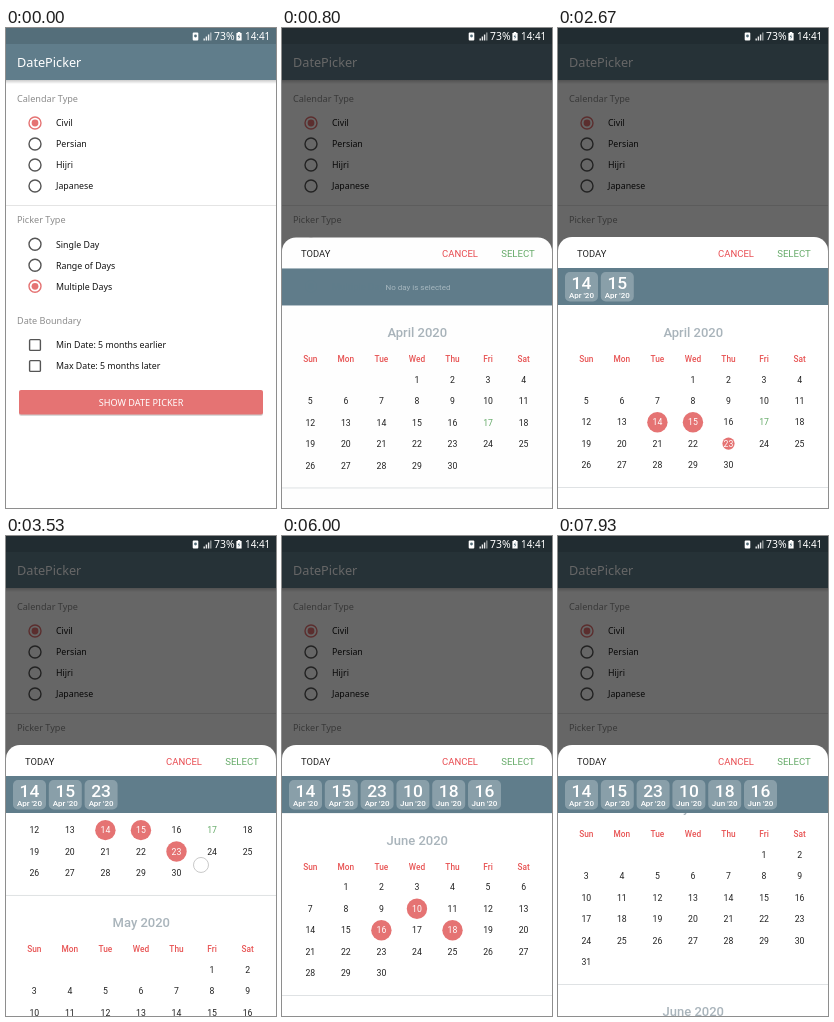
Recreate the animation shown at these times as an HTML page. Size 270 px wide and 480 px high, loop 8000 ms.

```html
<!DOCTYPE html>
<html lang="en">
<head>
<meta charset="utf-8">
<title>Date picker</title>
<style>
  html, body { margin: 0; width: 100%; height: 100%; overflow: hidden; background: #fff; }
  svg { display: block; width: 270px; height: 480px; }
  .ui { font-family: "Noto Sans", sans-serif; }
  .cal { font-family: Roboto, sans-serif; }
</style>
</head>
<body>
<svg id="stage" viewBox="0 0 270 480" width="270" height="480">
  <defs>
    <clipPath id="listClip"><rect y="277" width="270" height="203"/></clipPath>
    <clipPath id="btnClip"><rect x="13" y="362" width="244" height="24.5" rx="2"/></clipPath>
    <linearGradient id="shade" x2="0" y2="1">
      <stop offset="0" stop-opacity=".2"/><stop offset="1" stop-opacity="0"/>
    </linearGradient>
  </defs>
  <g id="form" class="ui"></g>
  <rect id="dim" width="270" height="480" opacity="0"/>
  <g id="sheet" class="cal" opacity="0"></g>
  <g id="status" class="ui"></g>
  <circle id="touch" r="7.5" fill="#fff" fill-opacity=".7" stroke="#bbb" stroke-width=".8" opacity="0"/>
</svg>
<script>
(() => {
const LOOP = 8000, RED = '#e57373', SLATE = '#607d8b', GREEN = '#66ab69';
const ROW = 21.4, COL = 35.55, COL0 = 28.3;
const $ = id => document.getElementById(id);
const clamp = v => Math.max(0, Math.min(1, v));
const ramp = (t, from, len) => clamp((t - from) / len);

function set(el, attrs) { for (const k in attrs) el.setAttribute(k, attrs[k]); }
function add(parent, tag, attrs) {
  const el = document.createElementNS('http://www.w3.org/2000/svg', tag);
  set(el, attrs);
  parent.appendChild(el);
  return el;
}

// y is the middle of the capital letters
function label(parent, str, x, y, size, fill, weight = 400, anchor = 'start') {
  const el = add(parent, 'text', {
    x, y: y + size * 0.357, 'font-size': size, fill, 'font-weight': weight, 'text-anchor': anchor
  });
  el.textContent = str;
  return el;
}

// Form behind the sheet
const form = $('form');
add(form, 'rect', { width: 270, height: 480, fill: '#fff' });
add(form, 'rect', { y: 52, width: 270, height: 4, fill: 'url(#shade)' });
add(form, 'rect', { width: 270, height: 52, fill: SLATE });
add(form, 'rect', { width: 270, height: 16, fill: '#546e7a' });
label(form, 'DatePicker', 11, 34.5, 12.7, '#fff');
add(form, 'rect', { y: 177, width: 270, height: 1, fill: '#e4e4e4' });

function section(title, y) { label(form, title, 11, y, 9.1, '#8c8c8c', 500); }
function option(text, y, on, box) {
  const stroke = on ? RED : '#555';
  if (box) add(form, 'rect', { x: 23.6, y: y - 5.4, width: 10.8, height: 10.8, rx: 1, fill: 'none', stroke, 'stroke-width': 1.4 });
  else add(form, 'circle', { cx: 29, cy: y, r: 6, fill: 'none', stroke, 'stroke-width': 1.4 });
  if (on) add(form, 'circle', { cx: 29, cy: y, r: 3.4, fill: RED });
  label(form, text, 50, y + .2, 8.8, '#111', 500);
}
section('Calendar Type', 70.5);
['Civil', 'Persian', 'Hijri', 'Japanese'].forEach((s, i) => option(s, 95 + 21 * i, i === 0));
section('Picker Type', 191.5);
['Single Day', 'Range of Days', 'Multiple Days'].forEach((s, i) => option(s, 216.3 + 21 * i, i === 2));
section('Date Boundary', 292.5);
['Min Date: 5 months earlier', 'Max Date: 5 months later'].forEach((s, i) => option(s, 317 + 21 * i, false, true));

add(form, 'rect', { x: 13, y: 363, width: 244, height: 24.7, rx: 2, opacity: .2 });
add(form, 'rect', { x: 13, y: 362, width: 244, height: 24.5, rx: 2, fill: RED });
const ripple = add(add(form, 'g', { 'clip-path': 'url(#btnClip)' }), 'circle', { cx: 150, cy: 374, fill: '#fff' });
label(form, 'SHOW DATE PICKER', 135, 374.5, 9.15, '#fff', 400, 'middle');

// Status icons
const bar = $('status');
add(bar, 'rect', { x: 186.7, y: 4.5, width: 5.6, height: 8, rx: 1, fill: '#fff' });
add(bar, 'circle', { cx: 189.5, cy: 8, r: 1.4, fill: '#546e7a' });
for (let i = 0; i < 4; i++)
  add(bar, 'rect', { x: 197.5 + 2.2 * i, y: 10.5 - 2 * i, width: 1.4, height: 2 + 2 * i, fill: '#fff', opacity: i < 3 ? .9 : .5 });
label(bar, '73%', 208, 8.7, 10.4, '#fff');
add(bar, 'path', { d: 'M230.4 5h1.3v-1h2.6v1h1.3v7.6h-5.2z', fill: '#fff' });
add(bar, 'path', { d: 'M233.5 6l-1.8 3h1.2l-.4 2.4 1.8-3h-1.2z', fill: '#546e7a' });
label(bar, '14:41', 239, 8.7, 9.9, '#fff');

// Sheet
const sheet = $('sheet');
add(sheet, 'path', { d: 'M0 600V223a14 14 0 0 1 14-14H256a14 14 0 0 1 14 14V600z', fill: '#fff' });

const list = add(add(sheet, 'g', { 'clip-path': 'url(#listClip)' }), 'g', {});
const days = {};
const months = [['April', 3, 30], ['May', 5, 31], ['June', 1, 30], ['July', 3, 31]];
let titleY = 304;
for (const [month, first, count] of months) {
  label(list, month + ' 2020', 135.3, titleY, 13, '#a9b4bb', 500, 'middle');
  'Sun Mon Tue Wed Thu Fri Sat'.split(' ').forEach((d, i) =>
    label(list, d, COL0 + COL * i, titleY + 26.8, 8.3, '#e85555', 500, 'middle'));
  for (let d = 1; d <= count; d++) {
    const cell = first + d - 1;
    const x = COL0 + COL * (cell % 7), y = titleY + 47.4 + ROW * Math.floor(cell / 7);
    const today = month === 'April' && d === 17;
    const dot = add(list, 'circle', { cx: x, cy: y, r: 0, fill: RED });
    const text = label(list, d, x, y, 8.7, today ? GREEN : '#222', 400, 'middle');
    days[month.slice(0, 3) + d] = { x, y, dot, text };
  }
  const rows = Math.ceil((first + count) / 7);
  add(list, 'rect', { y: titleY + 48 + ROW * rows, width: 270, height: 1, fill: '#dfe2e4' });
  titleY += 75.5 + ROW * rows;
}

add(sheet, 'rect', { y: 240, width: 270, height: 37, fill: SLATE });
label(sheet, 'TODAY', 19, 225.5, 9.4, '#222');
label(sheet, 'CANCEL', 178, 225.5, 9.5, '#e84a4f', 400, 'middle');
label(sheet, 'SELECT', 236, 225.5, 9.6, GREEN, 400, 'middle');
const hint = label(sheet, 'No day is selected', 136, 258.5, 8, '#fff', 400, 'middle');

const JUNE = 386.4;
const picks = [
  ['Apr', 14, 1500], ['Apr', 15, 2090], ['Apr', 23, 2620],
  ['Jun', 10, 4740], ['Jun', 18, 5170], ['Jun', 16, 5590]
].map(([month, num, at], i) => {
  const chip = add(sheet, 'g', { transform: `translate(${7 + 35.8 * i} 244)` });
  add(chip, 'rect', { width: 33, height: 29.5, rx: 5, fill: '#fff', opacity: .26 });
  label(chip, num, 16.5, 11, 17.4, '#fff', 500, 'middle');
  label(chip, month + " '20", 16.5, 23.3, 8, '#fff', 500, 'middle');
  return { at, chip, day: days[month + num], shift: month === 'Jun' ? JUNE : 0 };
});

// A swipe: accelerating drag of 98 px, then a decaying fling
function swipe(t, start, drag, power, reach, decay) {
  if (t < start) return 0;
  const u = t - start;
  if (u < drag) return 98 * Math.pow(u / drag, power);
  return reach - (reach - 98) * Math.exp(-decay * (u - drag));
}
function scrollAt(t) {
  if (t < 4700) return swipe(t, 3370, 160, 3, JUNE, .0071);
  if (t < 6260) return JUNE;
  if (t < 7100) return Math.max(0, JUNE - swipe(t, 6260, 150, 3, JUNE + .4, .01));
  return swipe(t, 7510, 210, 2, 290, .00445);
}
function touchAt(t, s) {
  if (t > 70 && t < 190) return [150, 374];
  for (const p of picks)
    if (t > p.at - 130 && t < p.at + 10) return [p.day.x + 3, p.day.y - p.shift + 3];
  if (t > 3320 && t < 3570) return [195, 429 - s];
  if (t > 6250 && t < 6420) return [165, 320 + JUNE - s];
  if (t > 7510 && t < 7730) return [180, 420 - s];
  return null;
}

function draw(t) {
  const shown = (1 - Math.cos(Math.PI * ramp(t, 562, 250))) / 2;
  const s = scrollAt(t);
  set(ripple, { r: 10 + 120 * ramp(t, 70, 300), opacity: t < 70 ? 0 : .25 * (1 - ramp(t, 300, 220)) });
  set($('dim'), { opacity: .6 * shown });
  set(sheet, { opacity: shown, transform: `translate(0 ${96 * (1 - shown)})` });
  set(list, { transform: `translate(0 ${-s})` });
  set(hint, { opacity: .45 * (1 - ramp(t, 1500, 150)) });
  for (const { at, chip, day } of picks) {
    const grow = ramp(t, at, 140);
    set(day.dot, { r: 10.2 * (1 - (1 - grow) ** 2) });
    if (day.text.textContent) set(day.text, { fill: grow > .3 ? '#fff' : '#222' });
    set(chip, { opacity: ramp(t, at + 200, 200) });
  }
  const p = touchAt(t, s);
  set($('touch'), p ? { cx: p[0], cy: p[1], opacity: 1 } : { opacity: 0 });
}

const began = performance.now();
function tick() {
  draw((performance.now() - began) % LOOP);
  requestAnimationFrame(tick);
}
tick();
})();
</script>
</body>
</html>
```
